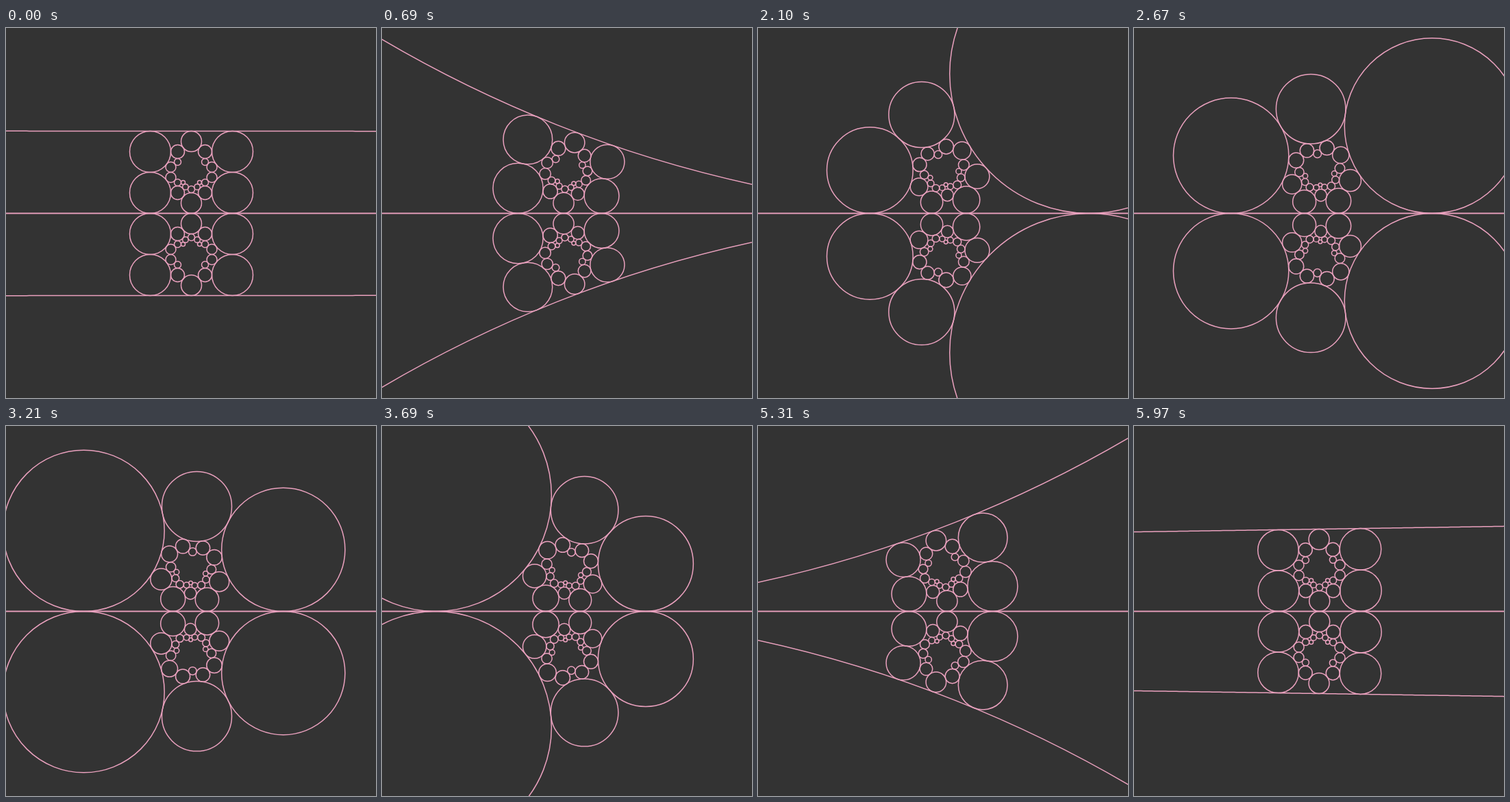
An HTML page with a canvas that plays this animation: 540 by 540 pixels, repeating every 6000 ms.

```html
<!DOCTYPE html>
<html>
<head>
<meta charset="utf-8">
<style>
html, body { margin: 0; width: 100%; height: 100%; overflow: hidden; background: #333; }
canvas { display: block; }
</style>
</head>
<body>
<canvas id="stage" width="540" height="540"></canvas>
<script>
const ctx = document.getElementById('stage').getContext('2d');
const LOOP = 6000, UNIT = 60, MID = 270.5;

// Circles [x, y, r] in the upper half plane; each has four copies turned about i.
const seeds = [
  [0, 1/4, 1/4],
  [1, 3/2, 1/2],
  [0, 7/4, 1/4],
  [1/2, 9/8, 1/8],
  [1/3, 3/2, 1/6],
  [1/3, 5/4, 1/12]
];

// Image of a circle under z -> (cz - s) / (sz + c)
function rotate([x, y, r], angle) {
  const c = Math.cos(angle), s = Math.sin(angle);
  const p = c * x - s, q = s * x + c;
  const d = q * q + s * s * (y * y - r * r);
  return [(p * q + c * s * (y * y - r * r)) / d, y / d, r / d];
}

function drawCircle(circle, side) {
  const [x, y, r] = circle.map(v => v * UNIT);
  ctx.beginPath();
  if (r < 2000) {
    ctx.arc(MID + x, MID - side * y, r, 0, 2 * Math.PI);
  } else {
    // Nearly straight: trace only the visible lower arc.
    for (let px = -6; px <= 546; px += 4) {
      const dx = px - MID - x;
      ctx.lineTo(px, MID - side * (y - Math.sqrt(r * r - dx * dx)));
    }
  }
  ctx.stroke();
}

function draw(now) {
  const quarter = Math.PI / 4;
  const turn = Math.max(1e-5, (now % LOOP) / LOOP * quarter);
  ctx.fillStyle = '#333';
  ctx.fillRect(0, 0, 540, 540);
  ctx.strokeStyle = '#eaa1be';
  ctx.lineWidth = 1.5;
  for (const side of [1, -1]) {
    ctx.beginPath();
    ctx.moveTo(0, MID);
    ctx.lineTo(540, MID);
    ctx.stroke();
    for (const seed of seeds)
      for (let k = 0; k < 4; k++) drawCircle(rotate(seed, turn + k * quarter), side);
  }
}

const start = performance.now();
function frame() {
  draw(performance.now() - start);
  requestAnimationFrame(frame);
}
frame();
</script>
</body>
</html>
```
